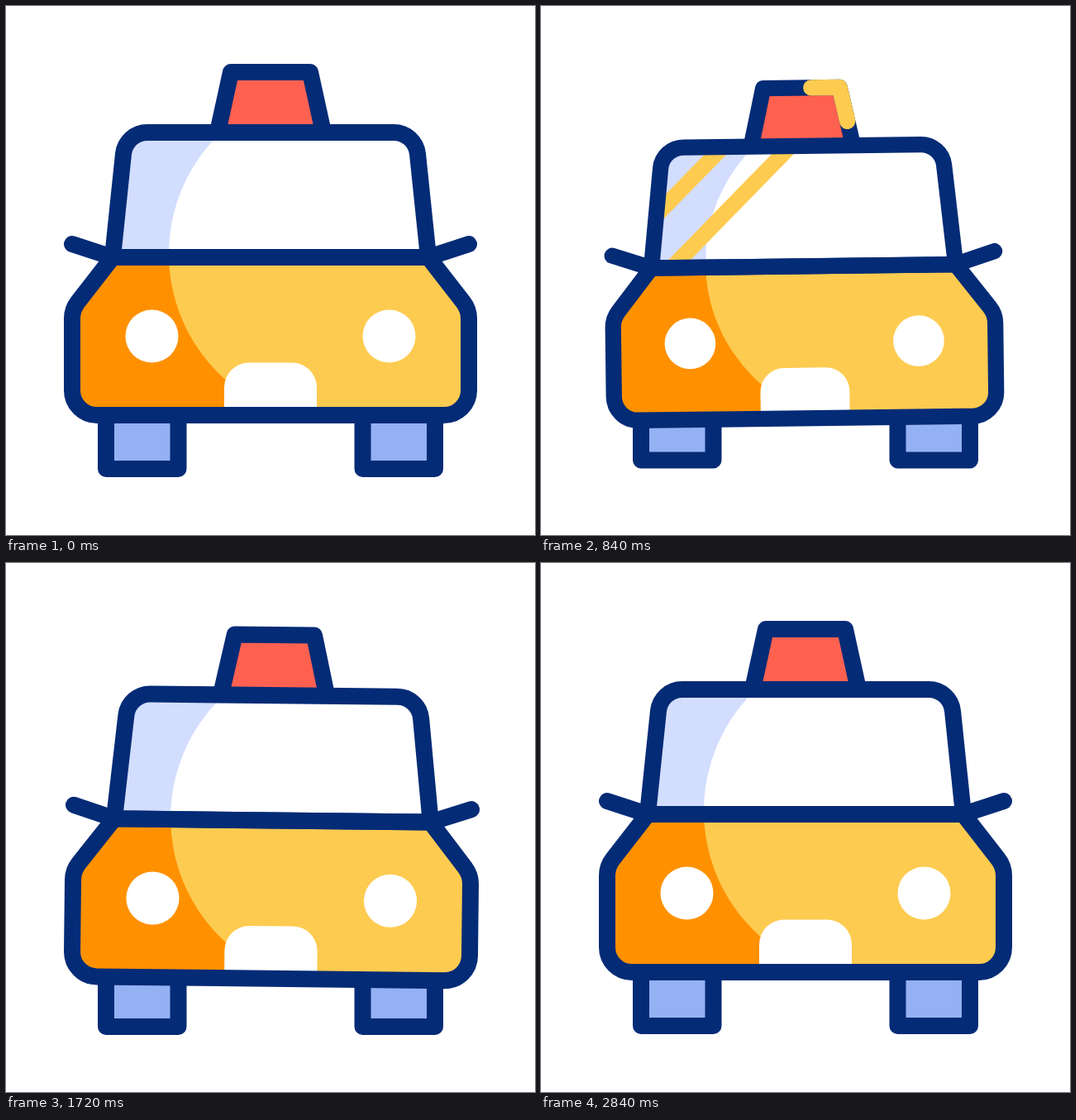
An HTML page that plays this animation: 640x640 px, repeating every 3 s.

```html
<!DOCTYPE html>
<html lang="en">
<head>
<meta charset="utf-8">
<title>Taxi</title>
<style>
  html, body { margin: 0; width: 100%; height: 100%; overflow: hidden; background: #fff; }
  svg { display: block; width: 100%; height: 100%; }
  .line { fill: none; stroke: #042b76; stroke-width: 20; stroke-linecap: round; stroke-linejoin: round; }
  .yellow { fill: #fdcb50; }
  .white { fill: #fff; }
</style>
</head>
<body>
<svg viewBox="0 0 640 640">
  <defs>
    <path id="cabin" d="M129 304 L142 179 A29 29 0 0 1 171 153 H469 A29 29 0 0 1 498 179 L511 304 Z"/>
    <path id="hull" d="M129 304 L87 358 Q80 367 80 378 V465 A30 30 0 0 0 110 495 H530 A30 30 0 0 0 560 465 V378 Q560 367 553 358 L511 304 Z"/>
    <path id="lamp" pathLength="1" d="M256 153 L272 80 H368 L384 153"/>
    <clipPath id="lit"><path d="M700 97 H400 A203 203 0 0 0 400 503 H700 Z"/></clipPath>
    <clipPath id="glass"><use href="#cabin"/></clipPath>
  </defs>

  <g id="wheels">
    <path class="line" style="fill:#94b1f3" d="M121 480 V560 H208.500 V480 Z M431.500 480 V560 H519 V480 Z"/>
  </g>

  <g id="body">
    <use href="#lamp" fill="#ff6151"/>
    <use href="#lamp" class="line"/>
    <use href="#lamp" class="line" id="runner" style="stroke:#fdcb50"/>

    <use href="#cabin" fill="#d3ddfe"/>
    <use href="#cabin" class="white" clip-path="url(#lit)"/>
    <g clip-path="url(#glass)">
      <path id="shine" class="yellow"/>
    </g>

    <use href="#hull" fill="#ff9100"/>
    <use href="#hull" class="yellow" clip-path="url(#lit)"/>
    <circle class="white" cx="176.500" cy="399.500" r="32"/>
    <circle class="white" cx="463.500" cy="399.500" r="32"/>
    <path class="white" d="M264 490 V461 A30 30 0 0 1 294 431.500 H346 A30 30 0 0 1 376 461 V490 Z"/>

    <use href="#cabin" class="line"/>
    <use href="#hull" class="line"/>
    <path class="line" d="M80 288 L129 304 M560 288 L511 304"/>
  </g>
</svg>
<script>
  const LOOP = 3000, STEP = 40;
  const TIMES = [0, 520, 1080, 1400, 1720, 2000, 2240, 2400, 2840];
  const SCALE = [1, 0.9775, 0.953, 0.976, 1.002, 1.02, 1.0145, 1.0095, 1];
  const TILT  = [0, -0.43, -0.9, -0.32, 0.65, 0.85, 0.6, 0.45, 0];
  const WHEEL = [0, -6, -14, -8, 0.9, 4.3, 3, 2, 0];

  const $ = id => document.getElementById(id);
  const wheels = $('wheels'), body = $('body'), runner = $('runner'), shine = $('shine');

  function keyed(values, t) {
    const i = TIMES.findIndex(time => time > t);
    if (i < 0) return values[values.length - 1];
    const p = (t - TIMES[i - 1]) / (TIMES[i] - TIMES[i - 1]);
    return values[i - 1] + (values[i] - values[i - 1]) * p;
  }

  function ease(t, from, to) {
    const p = Math.min(1, Math.max(0, (t - from) / (to - from)));
    return p * p * (3 - 2 * p);
  }

  const hump = p => 1 - Math.cos(2 * Math.PI * p);

  function dip(t) {
    if (t < 2080) return 5 * hump(t / 1040);
    return t < 2840 ? 0.3 * hump((t - 2080) / 760) : 0;
  }

  // A slanted stripe whose lower left corner meets the sill (y = 294) at x
  const stripe = x => `M${x - 20} 314 h28 l180 -180 h-28 Z`;

  function draw(t) {
    wheels.setAttribute('transform', `translate(0 ${keyed(WHEEL, t)})`);
    body.setAttribute('transform',
      `translate(320 ${510 + dip(t)}) rotate(${keyed(TILT, t)}) scale(${keyed(SCALE, t)}) translate(-320 -510)`);

    const head = ease(t, 0, 1080), tail = ease(t, 520, 1120);
    runner.style.display = head - tail > 0.001 ? '' : 'none';
    runner.style.strokeDasharray = `${head - tail} 2`;
    runner.style.strokeDashoffset = -tail;

    const x = 145 + 0.685 * (t - 1080);
    shine.setAttribute('d', [0, 85, 170].map(gap => stripe(x + gap)).join(' '));
  }

  function tick() {
    const t = performance.now() % LOOP;
    draw(Math.floor(t / STEP) * STEP);
    requestAnimationFrame(tick);
  }
  tick();
</script>
</body>
</html>
```
